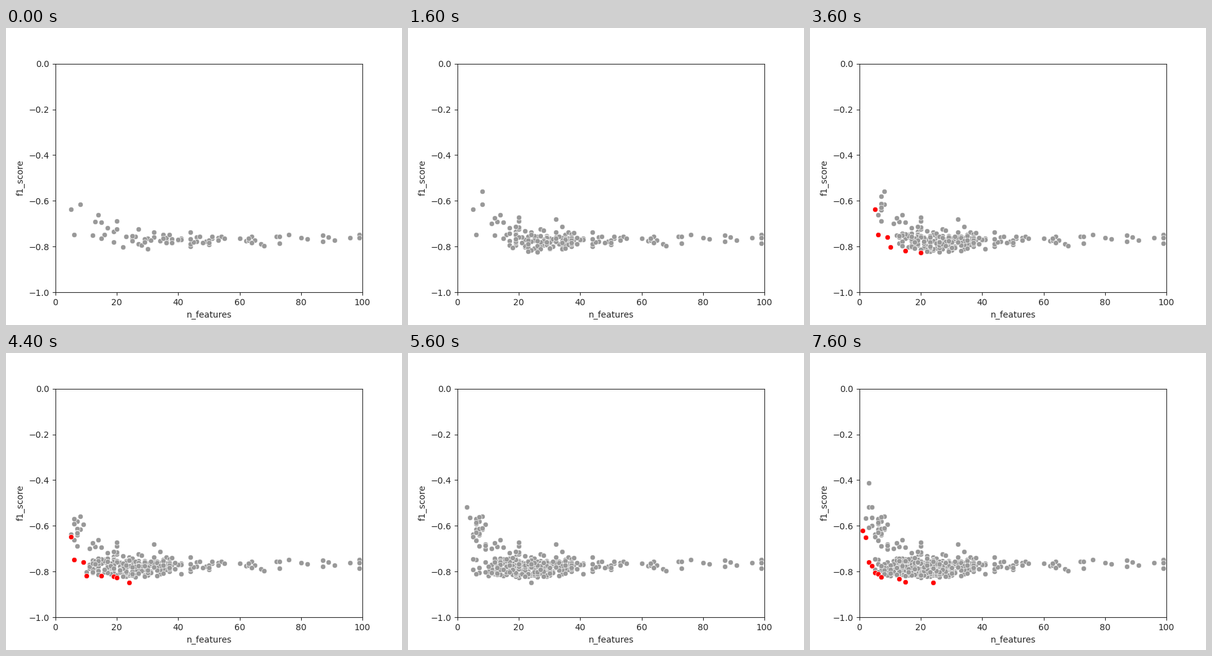
Recreate the animation shown at these times as a matplotlib script. Size 640x480 px, loop 8 s.

```python
import numpy as np
import matplotlib.pyplot as plt
from matplotlib.animation import FuncAnimation

STEP_MS = 400
GENERATIONS = 10
INK = "0.15"

# New best points per generation: feature count, score in thousandths.
LEADERS = [
    [(5, 637), (6, 747), (12, 751), (15, 764), (19, 780), (22, 802), (30, 811)],
    [],
    [(17, 794), (18, 805), (23, 821), (26, 824)],
    [(10, 802), (15, 819)],
    [(9, 760), (20, 827)],
    [(5, 648), (10, 818), (19, 821), (24, 848)],
    [(3, 519), (5, 745)],
    [(4, 564), (5, 790), (6, 811)],
    [(3, 759), (7, 824), (13, 832), (15, 846)],
    [(1, 620), (2, 650), (4, 776), (5, 806)],
]

# Weak points that stand clear above the crowd, by generation.
STRAYS = {
    0: [(8, 616), (14, 661), (15, 694), (20, 689)],
    1: [(12, 675), (32, 680), (34, 713), (99, 785)],
    2: [(8, 559), (20, 673), (11, 700)],
    3: [(7, 613), (41, 810)],
    8: [(4, 519), (4, 600)],
    9: [(3, 413), (2, 567), (3, 608)],
}


def to_points(pairs):
    return [(n, -score / 1000) for n, score in pairs]


def best_up_to(n, known):
    return min(score for size, score in known if size <= n)


def crowd(count, low, high, known, rng):
    """Points spread a little above the best score for their size."""
    points = []
    for n in rng.integers(low, high + 1, count):
        limit = max(best_up_to(n, known), -0.825)
        points.append((n, limit + 0.003 + 0.08 * rng.beta(1.2, 1.6)))
    return points


def first_spread(count, known, rng):
    """The wide opening band, narrowing towards many features."""
    points = []
    for u in rng.random(count):
        n = round(23 + 77 * u**1.3)
        score = rng.normal(-0.768, 0.019 - 0.009 * u)
        points.append((n, max(score, best_up_to(n, known) + 0.003)))
    return points


def newcomers(g, known, rng):
    if g == 0:
        return first_spread(72, known, rng) + crowd(6, 11, 20, known, rng)
    points = crowd(44, max(6, 21 - 2 * g), 40 - 7 * g // 4, known, rng)
    if 4 <= g <= 7:
        points += [(rng.integers(6, 10), rng.uniform(-0.69, -0.56))
                   for _ in range(5)]
    return points


def pareto(points):
    front, best = [], 0
    for n, score in sorted(points):
        if score < best:
            front.append((n, score))
            best = score
    return front


def evolve():
    rng = np.random.default_rng(8)
    leaders, population, history = [], [], []
    for g in range(GENERATIONS):
        leaders += to_points(LEADERS[g])
        population = (population + newcomers(g, leaders, rng)
                      + to_points(STRAYS.get(g, []) + LEADERS[g]))
        history.append(population)
    return history


history = evolve()
fronts = [pareto(points) for points in history]

plt.rcParams.update({"text.color": INK, "axes.labelcolor": INK,
                     "axes.edgecolor": INK, "xtick.color": INK,
                     "ytick.color": INK})
fig, ax = plt.subplots(figsize=(6.4, 4.8), dpi=100)
ax.set(xlim=(0, 100), ylim=(-1, 0), xlabel="n_features", ylabel="f1_score")
style = dict(s=36, edgecolors="white", linewidths=0.48)
dots = ax.scatter([], [], color="0.6", **style)
front_dots = ax.scatter([], [], color="red", **style)


def draw(frame):
    generation, show_front = divmod(frame, 2)
    dots.set_offsets(history[generation])
    front_dots.set_offsets(fronts[generation])
    front_dots.set_visible(bool(show_front))
    return dots, front_dots


anim = FuncAnimation(fig, draw, frames=2 * GENERATIONS, interval=STEP_MS,
                     repeat=True, repeat_delay=0)
plt.show()
```
